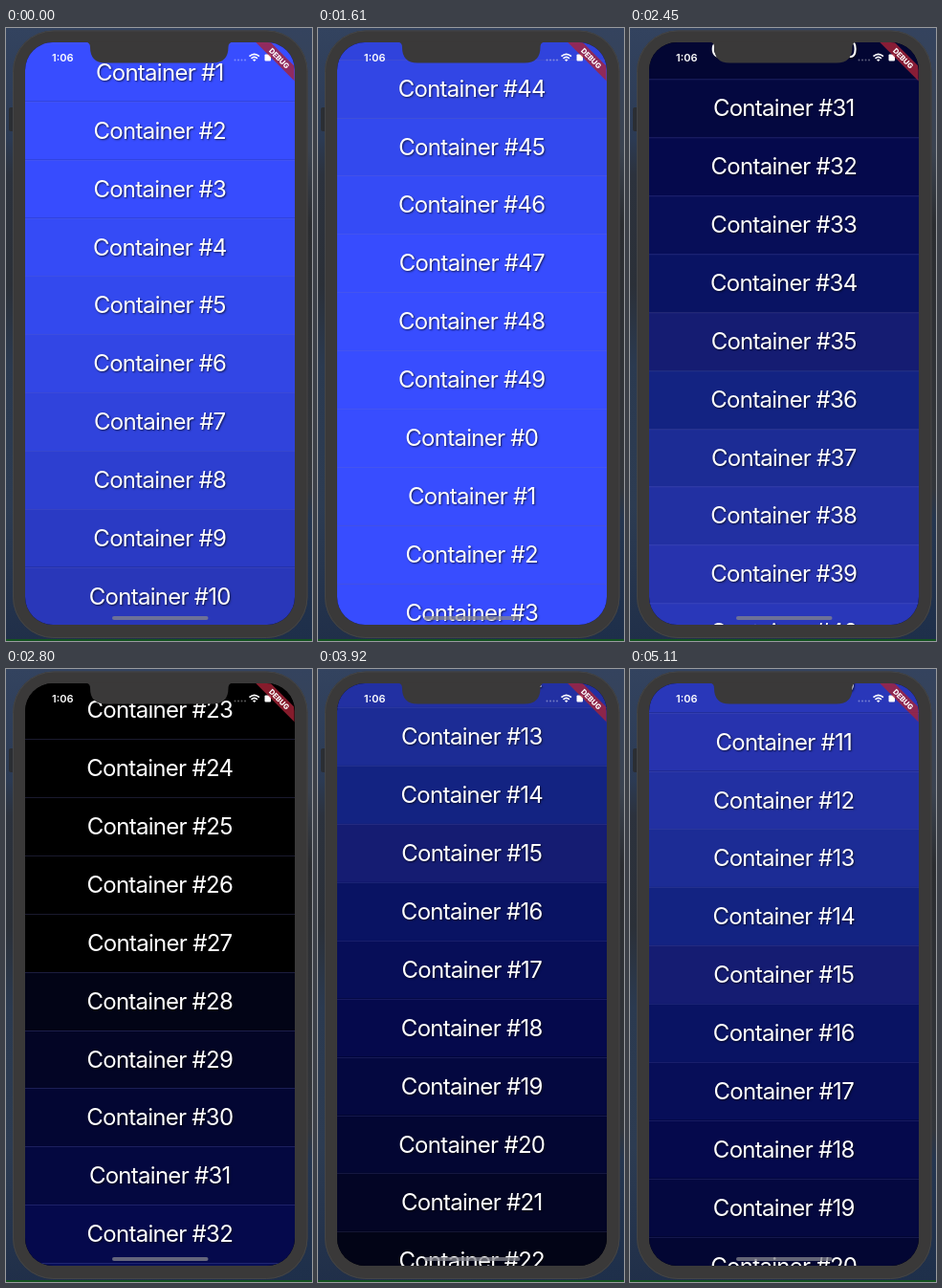
Recreate the animation shown at these times as an HTML page. Size 320 by 641 pixels, loop 5.18 s.

```html
<!DOCTYPE html>
<html lang="en">
<head>
<meta charset="utf-8">
<title>Endless container list</title>
<style>
  html, body { margin: 0; width: 100%; height: 100%; overflow: hidden; }
  body { background: #2a3549; font-family: Inter, Roboto, sans-serif; }
  #stage { position: relative; width: 320px; height: 641px; overflow: hidden; }
  svg { position: absolute; left: 0; top: 0; }
  #screen {
    position: absolute; left: 20px; top: 15px; width: 281.5px; height: 609px;
    border-radius: 29px; overflow: hidden; background: #000;
  }
  #list { position: absolute; left: 0; top: 0; width: 100%; }
  .row {
    position: absolute; width: 100%; height: 61.5px; line-height: 61px;
    box-sizing: border-box; text-align: center; white-space: nowrap;
    color: #fff; font-size: 24px; letter-spacing: -.03em; font-optical-sizing: none;
    text-shadow: 1px 1px 2px rgba(0, 0, 0, .65);
    box-shadow: inset 0 1px rgba(110, 110, 190, .24);
  }
</style>
</head>
<body>
<div id="stage">
  <svg width="320" height="641">
    <defs>
      <linearGradient id="sea" x2="0" y2="1">
        <stop offset="0" stop-color="#33435f"/>
        <stop offset=".18" stop-color="#2c3b54"/>
        <stop offset=".24" stop-color="#2c323d"/>
        <stop offset=".42" stop-color="#2b3038"/>
        <stop offset=".55" stop-color="#2b3a50"/>
        <stop offset=".78" stop-color="#2d3c52"/>
        <stop offset="1" stop-color="#202f49"/>
      </linearGradient>
      <linearGradient id="rocks" x2="0" y2="1">
        <stop offset="0" stop-color="#34435e"/>
        <stop offset=".2" stop-color="#3b4350"/>
        <stop offset=".32" stop-color="#2b2d31"/>
        <stop offset=".75" stop-color="#33363b"/>
        <stop offset=".8" stop-color="#253650"/>
        <stop offset="1" stop-color="#1e2f4a"/>
      </linearGradient>
    </defs>
    <rect width="160" height="641" fill="url(#sea)"/>
    <rect x="160" width="160" height="641" fill="url(#rocks)"/>
    <rect y="639" width="320" height="2" fill="#12521f"/>
    <rect x="3" y="83" width="6" height="25" rx="2" fill="#2b2e33"/>
    <rect x="7" y="2.500" width="308.500" height="635.500" rx="43" fill="#3a3939"/>
    <rect x="7.500" y="3" width="307.500" height="634.500" rx="42.500" fill="none" stroke="#444547"/>
  </svg>

  <div id="screen"><div id="list"></div></div>

  <svg width="320" height="641">
    <path fill="#3a3939" d="M83 14.500Q88 15 88 20Q88 36.500 104 36.500H216Q232.500 36.500 232.500 20Q232.500 15 237.500 14.500Z"/>
    <text x="48" y="35" fill="#fff" font-size="11" font-weight="600">1:06</text>
    <g fill="#fff" fill-opacity=".35">
      <circle cx="239.500" cy="33.500" r="1"/><circle cx="243" cy="33.500" r="1"/>
      <circle cx="246.500" cy="33.500" r="1"/><circle cx="250" cy="33.500" r="1"/>
    </g>
    <g fill="none" stroke="#fff" stroke-width="1.600">
      <path d="M254.500 29.700Q259.700 24.900 264.900 29.700"/>
      <path d="M256.500 31.900Q259.700 29 262.900 31.900"/>
    </g>
    <path fill="#fff" d="M257.900 33.200Q259.700 31.800 261.500 33.200L259.700 35Z"/>
    <rect x="270.500" y="27.500" width="6.500" height="7" rx="1" fill="#fff"/>
    <clipPath id="glass"><rect x="20" y="15" width="281.500" height="609" rx="29"/></clipPath>
    <g clip-path="url(#glass)">
      <g transform="translate(285.700 31.700) rotate(45)">
        <rect x="-40" y="-5.500" width="80" height="11" fill="#a82438" fill-opacity=".8"/>
        <text y="2.800" fill="#fff" font-size="7.600" font-weight="800" text-anchor="middle">DEBUG</text>
      </g>
    </g>
    <rect x="111" y="615" width="100.500" height="4" rx="2" fill="#84848c" fill-opacity=".75"/>
  </svg>
</div>

<script>
const PITCH = 60.88, COUNT = 50, STEP = 70, LOOP = 5180, SCREEN_TOP = 15;

// Shades by distance from the darkest container, number 25.
const SHADES = [
  [2, 0, 0, 0], [3, 2, 4, 22], [5, 3, 6, 51], [7, 5, 9, 76], [9, 9, 19, 99],
  [10, 21, 28, 114], [11, 19, 35, 130], [12, 28, 44, 149], [14, 39, 51, 174],
  [16, 42, 58, 196], [18, 48, 67, 220], [20, 51, 73, 238], [22, 55, 76, 254]
];

function shade(index) {
  const distance = Math.abs(index - 25);
  if (distance <= SHADES[0][0]) return "#000";
  const next = SHADES.findIndex(s => s[0] >= distance);
  if (next < 0) return "rgb(56,77,255)";
  const a = SHADES[next - 1], b = SHADES[next];
  const mix = (distance - a[0]) / (b[0] - a[0]);
  return `rgb(${[1, 2, 3].map(c => Math.round(a[c] + (b[c] - a[c]) * mix))})`;
}

const list = document.getElementById("list");
for (let k = -43; k <= 11; k++) {
  const index = (k + COUNT) % COUNT;
  const row = document.createElement("div");
  row.className = "row";
  row.textContent = "Container #" + index;
  row.style.top = k * PITCH + "px";
  row.style.background = shade(index);
  list.append(row);
}

// Drag phase: time, centre of container 0, velocity in px/ms.
const DRAG = [
  [0, -14.7, .06], [840, 114.5, .27], [1610, 428.5, .6],
  [2170, 895.6, 1.1], [2800, 1686.4, 1.155]
];
const GLIDE = { start: 2800, from: 1686.4, distance: 791, decay: 685 };

function scrollAt(t) {
  if (t >= GLIDE.start) {
    return GLIDE.from + GLIDE.distance * (1 - Math.exp((GLIDE.start - t) / GLIDE.decay));
  }
  const i = DRAG.findIndex(p => p[0] > t);
  const [t0, y0, v0] = DRAG[i - 1], [t1, y1, v1] = DRAG[i];
  const d = t1 - t0, u = (t - t0) / d, w = 1 - u;
  return y0 * w * w * (1 + 2 * u) + y1 * u * u * (3 - 2 * u)
    + d * u * w * (v0 * w - v1 * u);
}

function draw(now) {
  const t = Math.floor((now % LOOP) / STEP) * STEP;
  const top = scrollAt(t) - PITCH / 2 - SCREEN_TOP;
  list.style.transform = `translateY(${top.toFixed(2)}px)`;
}

let start;
function tick(now) {
  start ??= now;
  draw(now - start);
  requestAnimationFrame(tick);
}
draw(0);
requestAnimationFrame(tick);
</script>
</body>
</html>
```
